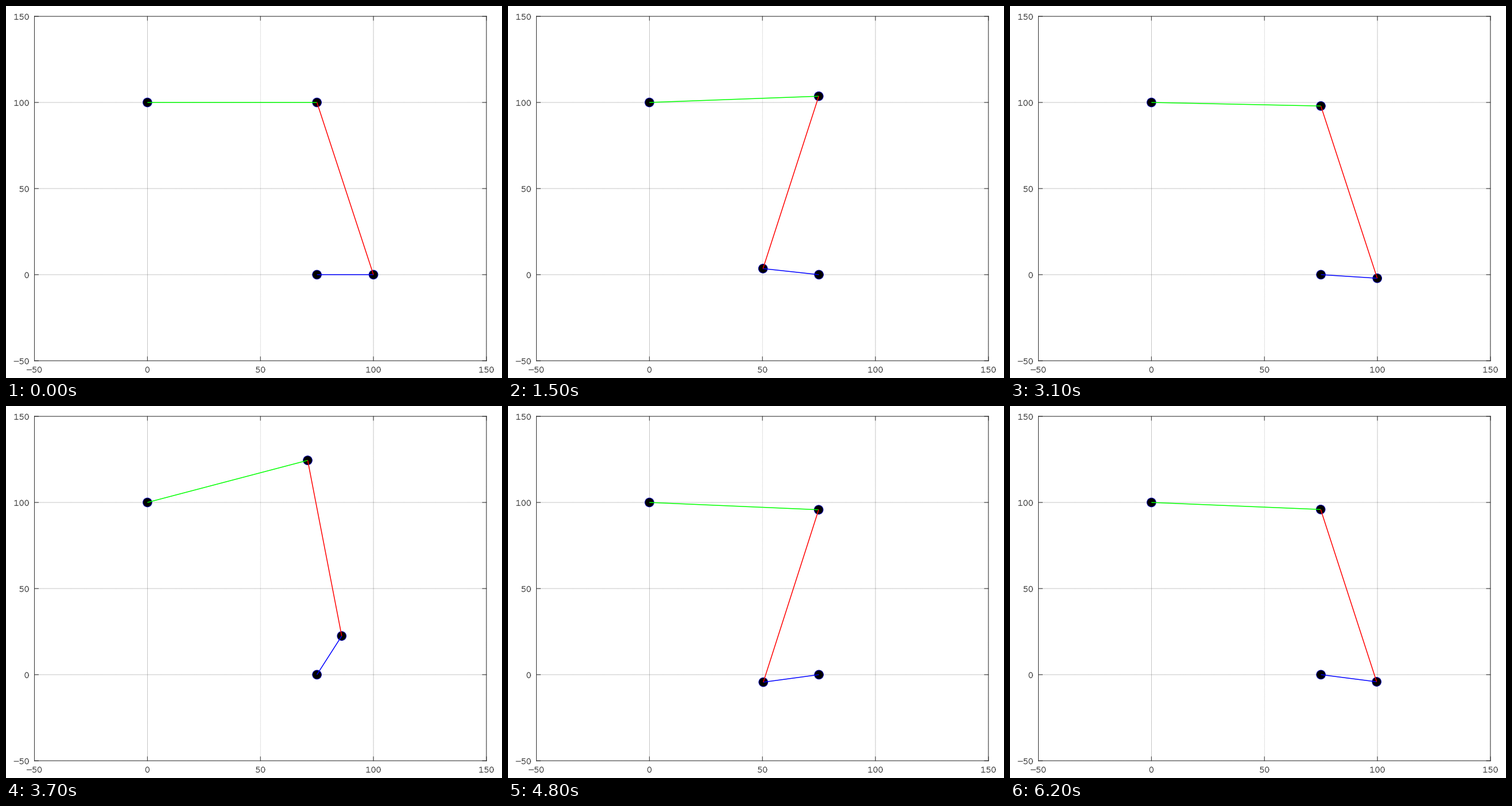
These frames come from a looping animation (864x648 px, 6300 ms). A matplotlib script:

```python
import numpy as np
import matplotlib.pyplot as plt
from matplotlib.animation import FuncAnimation
from matplotlib.patches import Ellipse
from matplotlib.transforms import Affine2D

W, H, DPI = 864, 648, 100
PX = 72 / DPI                                    # points per pixel
LEFT, RIGHT, TOP, BOTTOM = 49.5, 836.9, 18, 618
SX, SY = (RIGHT - LEFT) / 200, (BOTTOM - TOP) / 200   # pixels per data unit
FRAMES, INTERVAL, STEP = 63, 100, 0.2            # STEP: crank radians per frame

CRANK_PIVOT = np.array([75.0, 0.0])
ROCKER_PIVOT = np.array([0.0, 100.0])
CRANK, ROCKER, COUPLER = 25, 75, np.hypot(25, 100)

fig = plt.figure(figsize=(W / DPI, H / DPI), dpi=DPI, facecolor="white")
ax = fig.add_axes([LEFT / W, 1 - BOTTOM / H, (RIGHT - LEFT) / W, (BOTTOM - TOP) / H])
ax.set(xlim=(-50, 150), ylim=(-50, 150), xticks=[], yticks=[])
for spine in ax.spines.values():
    spine.set(linewidth=1 * PX, edgecolor="#303030", snap=False)

# Pixel coordinates with the origin at the top left
pixels = Affine2D().scale(1 / W, -1 / H).translate(0, 1) + fig.transFigure


def stroke(x, y, width=1.0):
    fig.add_artist(plt.Line2D(x, y, lw=width * PX, color="#303030",
                              transform=pixels, snap=False))


# Thin typewriter digits, as strokes in a cell 9 pixels wide
t = np.linspace(0, 2 * np.pi, 40)
bowl = np.linspace(2.2, -2.5, 24)
GLYPHS = {
    "0": [(4.5 + 3.1 * np.cos(t), 4.7 * np.sin(t))],
    "1": [([1.6, 4.5, 4.5], [-3.4, -4.6, 4.5]), ([1.4, 7.6], [4.5, 4.5])],
    "5": [(np.r_[7.0, 2.2, 2.2, 4.2 + 3.3 * np.cos(bowl)],
           np.r_[-4.5, -4.5, -0.6, 1.6 - 3.1 * np.sin(bowl)])],
    "-": [([0.6, 8.4], [0.2, 0.2])],
}


def label(text, x, y):
    for i, char in enumerate(text):
        for gx, gy in GLYPHS[char]:
            stroke(x + 9 * i + np.asarray(gx), y + np.asarray(gy), 1.1)


for value in range(-50, 151, 50):
    text = str(value)
    x = LEFT + (value + 50) * SX
    y = BOTTOM - (value + 50) * SY
    label(text, x - 4.5 * len(text), 633.5)
    label(text, 40.6 - 9 * len(text), y + 0.8)
    for edge, inward in ((TOP, 7), (BOTTOM, -7)):
        stroke([x, x], [edge, edge + inward])
    for edge, inward in ((LEFT, 7), (RIGHT, -7)):
        stroke([edge, edge + inward], [y, y])
    dots = dict(lw=0.6 * PX, color="black", dashes=(1.67, 1.67), zorder=1, snap=False)
    ax.axvline(value, alpha=0.4 if value == 50 else 0.75, **dots)
    ax.axhline(value, alpha=0.75, **dots)


def disc():
    return ax.add_patch(Ellipse((0, 0), 15.6 / SX, 15.6 / SY, fc="black",
                                ec="#0000b0", lw=1 * PX, zorder=3))


def bar(color):
    return ax.plot([], [], color=color, lw=1.5 * PX, zorder=4,
                   solid_capstyle="butt", snap=False)[0]


discs = [disc() for _ in range(4)]
crank, rocker, coupler = bar("#0000ff"), bar("#00ff00"), bar("#ff0000")


def solve(angle):
    """Return the crank tip and the rocker tip of the four-bar linkage."""
    tip = CRANK_PIVOT + CRANK * np.array([np.cos(angle), np.sin(angle)])
    gap = tip - ROCKER_PIVOT
    dist = np.hypot(*gap)
    along = (dist**2 + ROCKER**2 - COUPLER**2) / (2 * dist)
    across = np.sqrt(ROCKER**2 - along**2)
    ux, uy = gap / dist
    return tip, ROCKER_PIVOT + along * np.array([ux, uy]) + across * np.array([-uy, ux])


def update(frame):
    tip, elbow = solve(STEP * frame)
    for joint, center in zip(discs, (CRANK_PIVOT, tip, elbow, ROCKER_PIVOT)):
        joint.set_center(center)
    for line, ends in ((crank, (CRANK_PIVOT, tip)), (rocker, (ROCKER_PIVOT, elbow)),
                       (coupler, (tip, elbow))):
        line.set_data(*np.transpose(ends))
    return *discs, crank, rocker, coupler


anim = FuncAnimation(fig, update, frames=FRAMES, interval=INTERVAL,
                     repeat=True, repeat_delay=0)
plt.show()
```
